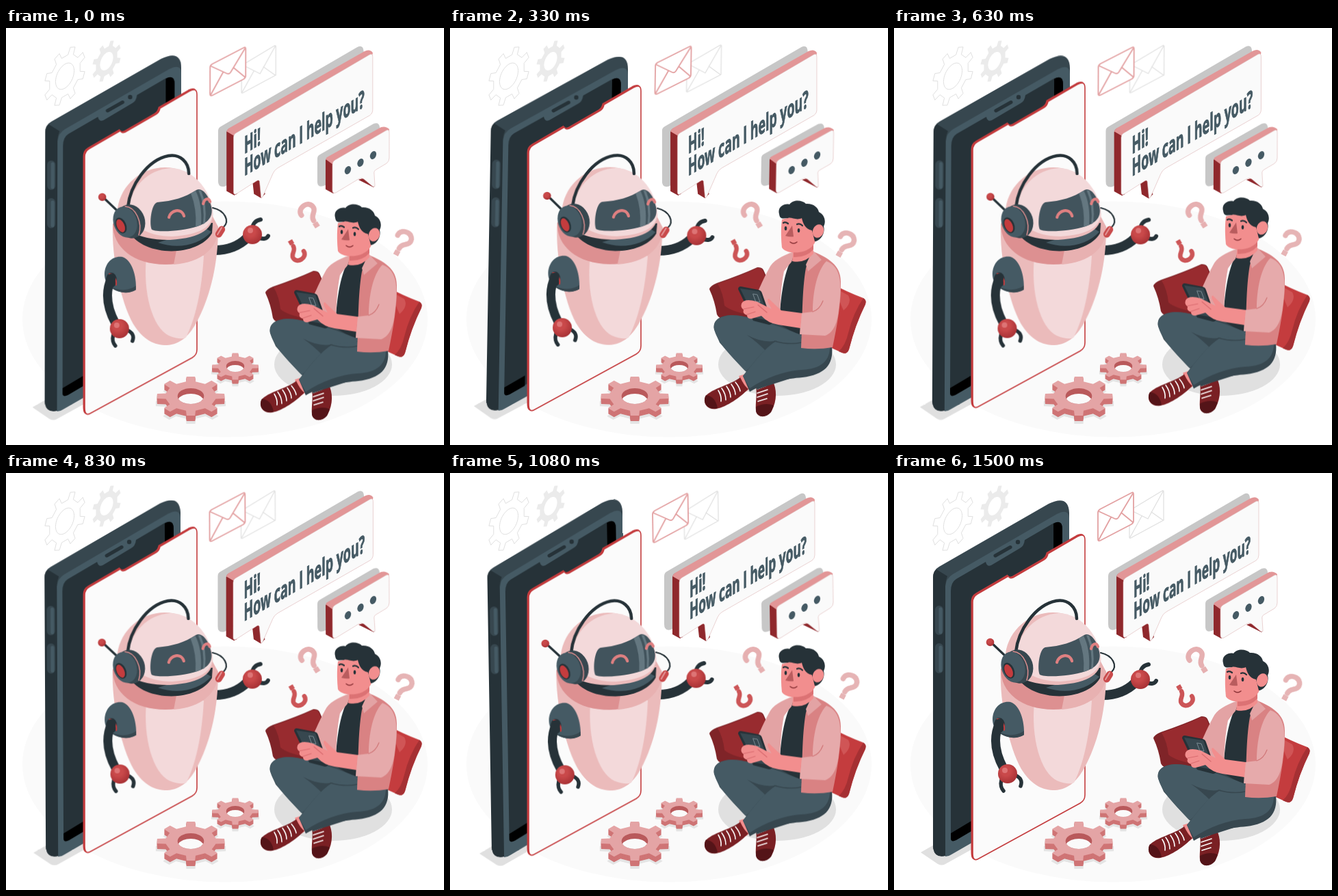
An HTML page that plays this animation: 640 by 610 pixels, repeating every 1540 ms.

```html
<!DOCTYPE html>
<html lang="en">
<head>
<meta charset="utf-8">
<title>Chatbot</title>
<style>
html, body { margin: 0; width: 100%; height: 100%; overflow: hidden; background: #fff; }
svg { display: block; width: 100%; height: 100%; }
.line { fill: none; stroke-linecap: round; stroke-linejoin: round; }
.dark { stroke: #263238; }
.red { stroke: #c43c3e; }
#phone { transform-origin: 148px 307px; }
#robot { transform-origin: 260px 326px; }
#extras { transform-origin: 446px 183px; }
#talk { transform-origin: 428px 140px; }
#reply { transform-origin: 508px 190px; }
text { font: 700 34px "Open Sans", "Noto Sans", sans-serif; fill: #455a64; stroke: #455a64; stroke-width: 1px; }
</style>
</head>
<body>
<svg viewBox="0 0 640 610">
  <defs>
    <radialGradient id="ball" cx=".4" cy=".35" r=".7">
      <stop offset=".35" stop-color="#c9494a"/><stop offset="1" stop-color="#a52f33"/>
    </radialGradient>
    <path id="ask" class="line" stroke-width="7.500" stroke-linecap="butt" d="M-10-5C-11-18 12-19 11-5C10 2 1 2 1 11"/>
    <path id="screen" d="M115 556V189Q115 181 122 177L167 151Q169 155 174 153L219 127Q224 124 225 118L268 93Q279 87 279 98V471Q279 479 272 483L123 564.500Q115 569 115 556Z"/>
  </defs>

  <ellipse cx="320" cy="426" rx="296" ry="172.500" fill="#fafafa"/>
  <g id="gears"></g>

  <g id="phone">
    <path fill="#e0e0e0" d="M39 555L60 543L140 536L75 572Q70 575 64 572Z"/>
    <path fill="#37474f" d="M57 153Q57 142 66 137L226 45Q255 31 256 58V459L80 559Q58 565 57 546Z"/>
    <path fill="#263238" d="M57 153Q57 145 62 141L78 151Q75 158 75 166V560Q58 564 57 546Z"/>
    <path fill="#455a64" d="M75 561V166Q76 154 86 148L238 60Q255 51 256 66V459L84 558Q80 561 75 561Z"/>
    <path fill="#263238" d="M83 534V173Q83 160 91 155L134 130Q136 138 142 135L184 110Q190 107 191 98L232 74Q246 67 246 82V445L91 536Q83 541 83 534Z"/>
    <path d="M233 74Q246 67 246 82V440H234ZM83 527L113 509V524L91 537Q83 541 83 534Z"/>
    <path class="line dark" stroke-width="5" d="M148 121L170 108.500"/>
    <circle cx="181" cy="101" r="3.200" fill="#263238"/>
    <path class="line" stroke="#37474f" stroke-width="12" d="M66 200V231M66 255V287"/>
    <path class="line" stroke="#455a64" stroke-width="5" d="M68 199V233M68 255V289"/>
  </g>

  <g id="panel">
    <use href="#screen" x="-1.500" y="-1" fill="#c43c3e" stroke="#c43c3e" stroke-width="2"/>
    <use href="#screen" fill="#fbfbfb" stroke="#c43c3e" stroke-width="1.600"/>
  </g>

  <g id="robot">
    <path class="line dark" stroke-width="14" stroke-linecap="butt" d="M305 325C324 325 341 318 352 307"/>
    <path class="line dark" stroke-width="6" d="M360 294C360 285 366 281 372 280M368 306C374 309 381 309 383 304"/>
    <circle cx="360" cy="302" r="14" fill="url(#ball)"/>
    <circle cx="357" cy="296" r="4" fill="#dd7475"/>
    <path fill="#ebbbbb" d="M156 288C154 335 168 402 186 433C201 457 217 464 235 464C255 463 269 450 281 426C300 388 310 342 310 292Z"/>
    <path fill="#f3d9da" d="M205 335C200 388 214 438 238 450C250 455 258 455 263 453C277 425 286 385 289 333Z"/>
    <path fill="#dd9091" d="M156 287C156 321 186 346 233 346C277 346 311 324 310 291L298 272H165Z"/>
    <path fill="#e8b1b1" d="M245 346C285 343 311 322 310 291L300 272L250 320Z"/>
    <path fill="#263238" d="M180 298C200 335 280 336 301 300L302 285H180Z"/>
    <path fill="#455a64" d="M222 314C250 324 282 318 300 298L290 292Z"/>
    <path fill="#ebbbbb" d="M232 204C198 204 168 229 163 264C159 294 196 311 240 310C286 307 305 293 302 268C298 234 269 204 232 204Z"/>
    <path fill="#f3d9da" d="M240 205C208 207 183 232 180 262C178 288 206 305 243 305C284 302 303 291 302 268C298 234 271 205 240 205Z"/>
    <path fill="#42545d" d="M221 255C212 257 209 287 213 295C221 299 256 298 280 290C298 284 304 273 299 258C295 243 286 233 278 237C261 248 244 253 221 255Z"/>
    <path fill="#647780" d="M270 242L277 238Q287 258 285 288L277 291Q279 265 270 242ZM281 237L285 238Q294 259 291 285L288 287Q291 260 281 237Z"/>
    <path class="line" stroke="#df8081" stroke-width="4.200" d="M238 277C240 267 256 262 260 275M288 257C290 249 296 248 298 254"/>
    <path class="line dark" stroke-width="4.500" d="M178 262C181 231 206 193 237 187C254 184 267 196 267 213"/>
    <path class="line dark" stroke-width="2.200" d="M302 263C320 267 327 282 318 291"/>
    <rect x="308" y="289" width="10" height="18" rx="5" fill="#c94a4b" transform="rotate(32 313 298)"/>
    <path class="line" stroke="#e39a9b" stroke-width="2" d="M315 292L309 302"/>
    <path class="line dark" stroke-width="3.200" d="M163 268L142 248"/>
    <circle cx="140.500" cy="247.500" r="5.800" fill="url(#ball)"/>
    <ellipse cx="182" cy="283" rx="21" ry="25" fill="#37474f" transform="rotate(-18 182 283)"/>
    <ellipse cx="174" cy="284" rx="17" ry="23" fill="#455a64" transform="rotate(-18 174 284)"/>
    <path class="line" stroke="#dd8f90" stroke-width="1.500" d="M174 261C189 262 200 284 194 303"/>
    <ellipse cx="168" cy="289" rx="7.500" ry="12" fill="#263238" transform="rotate(-24 168 289)"/>
    <ellipse cx="167.500" cy="289.500" rx="5.500" ry="10" fill="#c43c3e" transform="rotate(-24 167.500 289.500)"/>
    <path fill="#455a64" d="M144 360C145 342 157 333 170 335C184 339 191 363 190 383C180 390 161 388 152 378C146 373 144 367 144 360Z"/>
    <path fill="#37474f" d="M152 378C164 385 180 385 190 377V383C180 390 161 388 152 378Z"/>
    <ellipse cx="154" cy="369" rx="8" ry="11" fill="#263238"/>
    <path class="line red" stroke-width="2" d="M151 360C158 360 162 368 161 376"/>
    <path class="line dark" stroke-width="13" stroke-linecap="butt" d="M154 366C145 386 147 408 160 432"/>
    <path class="line dark" stroke-width="5.500" d="M157 449C155 456 157 462 160 465M175 441C185 445 188 450 185 458"/>
    <circle cx="166" cy="440" r="14" fill="url(#ball)"/>
    <circle cx="162" cy="435" r="4" fill="#dd7475"/>
  </g>

  <g id="extras">
    <g class="line" fill="#fff" stroke="#e0e0e0" stroke-width="1.300">
      <path d="M344 55L392 26Q394 25 394 28V69L346 95Q344 96 344 94ZM345 54L371 67L393 27M345 94L362 63M393 69L376 57"/>
    </g>
    <g class="line" stroke="#e3a1a2" stroke-width="1.800">
      <path fill="#fff" d="M298 58Q298 55 301 53L347 29Q350 27 350 31V70Q350 73 347 75L301 99Q298 100 298 97Z"/>
      <path d="M299 56L323 67Q326 68 328 65L349 30M299 98L317 65M349 72L332 58"/>
    </g>
    <g id="asks"></g>
  </g>

  <g id="talk">
    <path fill="#c7c7c7" d="M313 151Q313 146 317 144L511 31Q519 27 520 36V118L323 229Q313 232 313 221Z"/>
    <path fill="#8f282c" d="M325 152Q326 147 331 146L340 152L340 240L336 242L325 236ZM362 222L373 218L380 240L374 246L364 240Z"/>
    <path fill="#e29697" d="M325 151Q326 148 329 146L521 37Q529 33 533 39L532 46L337 158Z"/>
    <path fill="#fafafa" stroke="#ddb5b6" stroke-width=".6" d="M335 160Q335 155 339 153L528 42Q533 39 533 45V120Q533 125 529 128L398 203Q393 206 391 211L377 243Q374 248 374 243L372 222Q371 219 367 222L339 240Q335 242 335 237Z"/>
    <text transform="matrix(.51 -.294 0 1 350 183)">Hi!</text>
    <text transform="matrix(.51 -.294 0 1 350 214.500)">How can I help you?</text>
  </g>

  <g id="reply">
    <path fill="#c7c7c7" d="M455 191Q455 187 459 185L537 140Q545 137 546 145V186L467 230Q456 235 455 226Z"/>
    <path fill="#8f282c" d="M467 193L472 189L482 194V240L478 242L467 236ZM515 222L524 219L539 231L537 233Z"/>
    <path fill="#e29697" d="M467 192Q468 189 471 188L548 145Q555 143 560 148L559 154L478 200Z"/>
    <path fill="#fafafa" stroke="#ddb5b6" stroke-width=".6" d="M477 200Q477 195 481 193L555 150Q560 147 560 153V190Q560 195 556 198L541 207Q537 209 538 214L539 230Q539 234 535 231L523 221Q519 218 515 221L482 241Q477 243 477 237Z"/>
    <g id="dots" fill="#455a64"></g>
  </g>

  <ellipse cx="478" cy="492" rx="86" ry="46" fill="#e0e0e0"/>
  <g id="man">
    <path fill="#7f2428" d="M379 388Q380 383 390 379Q425 367 449 356Q457 355 459 362L478 405L430 436Q395 436 390 425Q387 405 379 388Z"/>
    <path fill="#982b2f" d="M391 380Q424 369 449 357Q456 356 458 363L476 405L435 425Q410 420 401 412Q399 393 391 380Z"/>
    <path fill="#c43c3e" d="M556 379Q580 392 604 401Q609 404 607 410Q592 440 583 476Q580 484 573 481L540 466Z"/>
    <path fill="#a53033" d="M604 401Q609 404 607 410Q592 440 583 476Q580 484 573 481L568 479Q578 470 582 452Q589 423 604 401Z"/>
    <path fill="#d05556" d="M566 388L582 397Q588 408 575 419Q568 405 566 388Z"/>

    <path fill="#7a2024" d="M447 530L471 521C478 534 478 551 470 566C462 577 449 576 447 566C446 554 449 543 447 530Z"/>
    <path fill="#541418" d="M447 560Q461 553 473 558L469 568C461 577 449 576 447 566Z"/>
    <path class="line" stroke="#fff" stroke-width="1.600" d="M449 534L462 529M449 540L464 535M449 546L464 541M450 552L463 548"/>
    <path fill="#f28e8e" d="M422 515L431 512L440 532L432 538Z"/>
    <path fill="#7a2024" d="M424 517C428 525 431 530 436 534C424 546 405 560 389 563C376 565 369 555 373 545C382 533 411 528 424 517Z"/>
    <path fill="#541418" d="M374 543Q388 545 391 562C377 565 369 555 373 545Z"/>
    <path class="line" stroke="#fff" stroke-width="1.600" d="M397 533Q403 541 403 550M404 530Q410 538 410 546M411 527Q417 535 417 542M417 524Q423 531 424 537M392 536Q397 544 396 552"/>

    <path fill="#37474f" d="M386 447C383 431 398 424 423 427L500 440L558 472L540 505L465 529L448 535L447 522L430 506Q410 485 394 466Z"/>
    <path fill="#455a64" d="M386 446C384 431 400 423 425 427C455 433 490 445 515 456L500 478L462 482L432 508C410 485 390 465 386 446Z"/>
    <path fill="#37474f" d="M434 455Q458 468 480 463L464 481Q450 466 434 455Z"/>
    <path fill="#37474f" d="M558 472C561 499 547 513 515 517C492 519 464 523 438 538L428 515C445 494 458 475 478 464L530 460Z"/>
    <path fill="#455a64" d="M555 470C556 492 543 505 513 506C488 508 462 517 438 533L428 515C445 494 458 475 478 463L530 458Z"/>
    <path class="line" stroke="#37474f" stroke-width="1.500" d="M474 464Q496 470 513 466"/>

    <path fill="#263238" d="M500 342L529 341L521 380L515 455Q494 449 481 438C483 402 487 365 500 342Z"/>
    <path fill="#e3a3a4" d="M503 333C484 339 471 347 466 358C456 376 450 393 443 405L468 429L482 425C483 402 484 381 488 362L499 347Z"/>
    <path fill="#d98283" d="M529 332C552 342 571 352 571 377C572 405 566 440 559 473Q536 477 513 474C515 437 514 390 520 357Z"/>
    <path fill="#e6aaab" d="M550 347C573 355 573 385 568 418C566 438 560 452 548 456L511 454L513 423L530 421C530 393 536 361 550 347Z"/>
    <path class="line" stroke="#d07677" stroke-width="1.200" d="M530 421Q540 418 545 405"/>
    <path fill="#e3a3a4" d="M504 333L499 348L487 362L483 344ZM530 331L543 345L523 362L520 352Z"/>
    <path fill="#f28e8e" d="M502 325L530 320L531 336Q518 351 500 347Z"/>
    <path fill="#dc7274" d="M502 334Q520 333 531 322V330Q520 342 502 341Z"/>
    <path fill="#f28e8e" d="M485 286C483 302 484 317 485 327C490 336 510 336 521 331C532 325 537 318 536 300L520 277Z"/>
    <path fill="#263238" d="M481 278C478 268 488 262 496 264C502 256 515 258 520 263C530 262 538 268 539 275C547 279 550 288 546 296C549 307 540 318 533 318L529 302C519 300 516 292 514 284C506 288 499 282 494 284C488 284 482 287 481 278Z"/>
    <ellipse cx="538" cy="303" rx="8" ry="10" fill="#f28e8e" transform="rotate(20 538 303)"/>
    <path fill="#b95c5e" d="M500 295L490 310Q497 312 502 311Z"/>
    <g fill="#263238"><ellipse cx="490.500" cy="299" rx="1.800" ry="3"/><ellipse cx="509.500" cy="302" rx="1.800" ry="3"/></g>
    <path class="line dark" stroke-width="2.200" d="M487 291Q490 289 494 292M507 293Q511 291 515 295"/>
    <path class="line" stroke="#8c3438" stroke-width="1.500" d="M497 319Q502 323 507 319"/>

    <path fill="#263238" d="M421 388Q421 384 425 384L451 389Q455 390 456 394L471 437Q470 440 466 440L443 434Z"/>
    <path fill="#37474f" d="M424 387L452 391L467 434L445 430Z"/>
    <path class="line" stroke="#7b8b93" d="M443 395L449 396L453 407L447 406Z"/>
    <path fill="#f28e8e" d="M514 423L484 419Q473 409 466 402Q462 402 466 410L470 417L448 406Q430 401 426 409Q424 415 429 418Q427 424 434 426Q434 432 441 431L455 427Q465 438 480 440L512 445Z"/>
    <path class="line" stroke="#d96c70" stroke-width="1.200" d="M429 417L444 414M434 425L446 421M450 411L463 422"/>
  </g>
</svg>
<script>
const $ = id => document.getElementById(id);
const add = (id, markup) => $(id).insertAdjacentHTML('beforeend', markup);

// Toothed outline on an axonometric plane: x = a*u, y = b*u + c*v
function gearPath(x, y, r, [a, b, c], { teeth = 8, root = .75, hole = 0, turn = 0 } = {}) {
  const at = (k, rad) => {
    const u = Math.cos(k) * rad, v = Math.sin(k) * rad;
    return (x + a * u).toFixed(1) + ' ' + (y + b * u + c * v).toFixed(1);
  };
  const pts = [], step = 2 * Math.PI / teeth;
  for (let i = 0; i < teeth; i++) {
    const mid = (i + turn) * step - Math.PI / 2;
    pts.push(at(mid - step * .24, r * root), at(mid - step * .16, r), at(mid + step * .16, r), at(mid + step * .24, r * root));
  }
  let d = 'M' + pts.join('L') + 'Z';
  if (hole) {
    const ring = Array.from({ length: 40 }, (_, i) => at(i * Math.PI / 20, r * hole));
    d += 'M' + ring.join('L') + 'Z';
  }
  return d;
}

function wallGear(x, y, r, style) {
  const d = gearPath(x, y, r, [.85, -.5, 1.1], { hole: .45, turn: .5 });
  add('gears', `<path d="${d}" fill-rule="evenodd" stroke-linejoin="round" ${style}/>`);
}

function floorGear(x, y, r, rise) {
  const plane = [1, 0, .58], hole = .39;
  const body = gearPath(x, y, r, plane);
  const hx = r * hole, hy = hx * .6;
  const dx = hx * Math.sqrt(1 - (rise / 2 / hy) ** 2), my = y + rise / 2;
  let out = `<path d="${gearPath(x, y + rise + 3, r * 1.04, plane)}" fill="#e4e4e4"/>`;
  for (let i = rise; i > 0; i--)
    out += `<path d="${body}" transform="translate(0 ${i})" fill="#cf7475"/>`;
  out += `<path d="${body}" fill="#e4a4a5"/>
    <ellipse cx="${x}" cy="${y}" rx="${hx}" ry="${hy}" fill="#b9595b"/>
    <path d="M${x - dx} ${my}A${hx} ${hy} 0 0 1 ${x + dx} ${my}A${hx} ${hy} 0 0 1 ${x - dx} ${my}" fill="#fafafa"/>`;
  add('gears', out);
}

wallGear(86, 70.5, 35.5, 'fill="none" stroke="#e0e0e0"');
wallGear(147, 48.5, 25, 'fill="#ebebeb"');
floorGear(335, 495, 34, 6);
floorGear(270, 538.5, 49.5, 8);

const asks = [
  [443, 273, -32, 1, '#e6b0b1'],
  [425.5, 327, 150, .87, '#cc5557'],
  [579, 312, 28, 1, '#e6b4b5']
];
for (const [x, y, turn, size, color] of asks)
  add('asks', `<g transform="translate(${x} ${y}) rotate(${turn}) scale(${size})">
    <use href="#ask" stroke="${color}"/><rect x="-3" y="14.500" width="8" height="7.500" fill="${color}"/></g>`);

for (let i = 0; i < 3; i++) {
  const x = 499.5 + i * 18.5, y = 208 - i * 11;
  add('dots', `<ellipse cx="${x}" cy="${y}" rx="4.300" ry="6.200" transform="rotate(24 ${x} ${y})"/>`);
}

const sway = [[0, 'rotate(0deg)'], [.25, 'rotate(1deg)'], [.75, 'rotate(-1deg)'], [1, 'rotate(0deg)']];
const lift = [[0, 'translateY(0px)'], [.5, 'translateY(-12.2px)'], [1, 'translateY(0px)']];
const beat = [[0, 1], [.1, 1.1], [.3, 1], [.4, 1], [.5, 1.1], [.6, 1], [1, 1]].map(([t, s]) => [t, `scale(${s})`]);
const moves = { phone: sway, robot: sway, extras: sway, reply: sway, panel: lift, man: lift, talk: beat };

// 37 held poses per loop
const timing = { duration: 1540, delay: -4, iterations: Infinity, easing: 'steps(37, start)' };
for (const id in moves)
  $(id).animate(moves[id].map(([offset, transform]) => ({ offset, transform })), timing);
</script>
</body>
</html>
```
